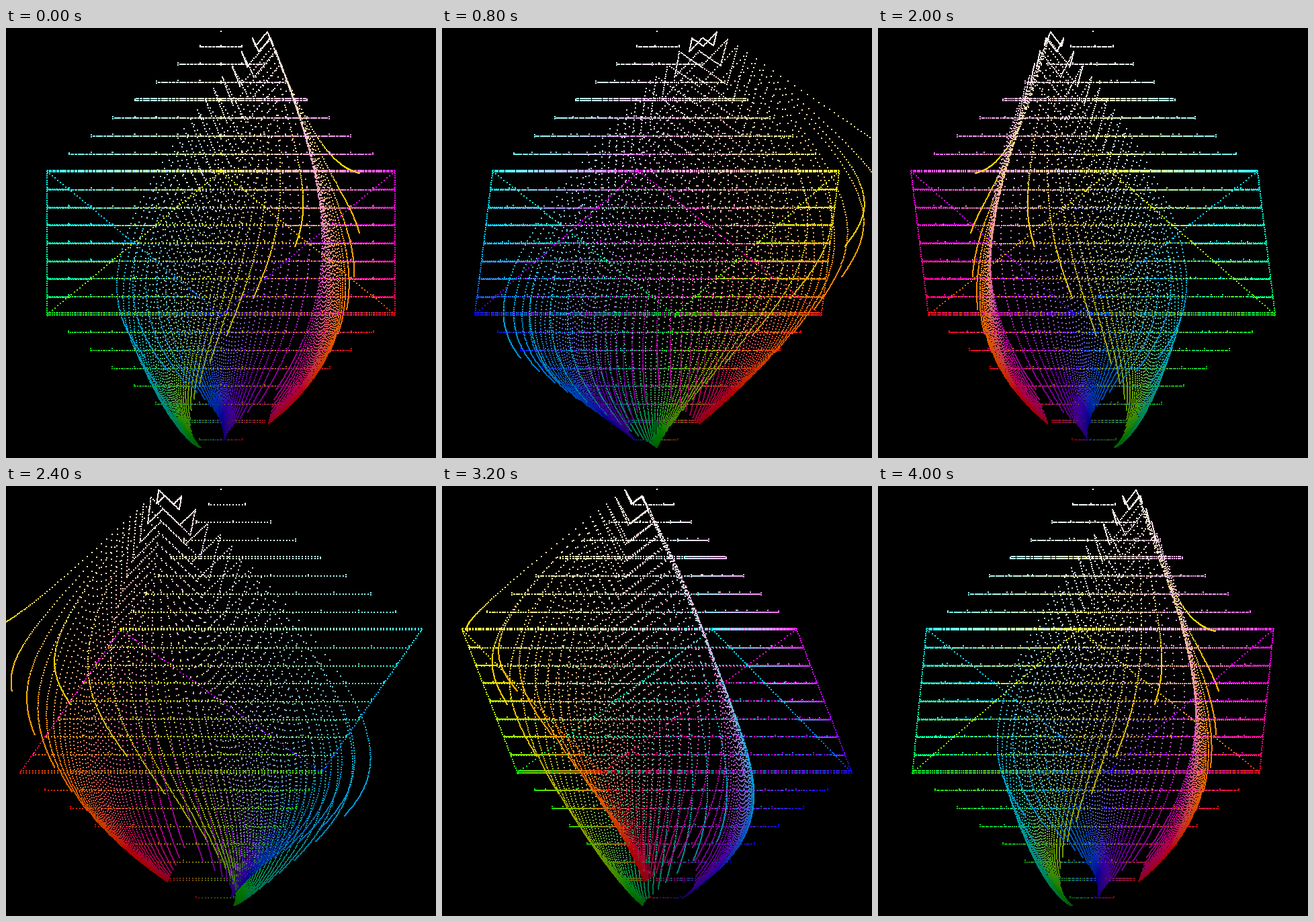
A matplotlib script for the animation above (4100 ms loop, 640 px wide and 640 px high).

```python
import itertools
import numpy as np
import matplotlib.pyplot as plt
from matplotlib.animation import FuncAnimation

SIZE = 640
FRAMES, INTERVAL = 41, 100
RADIUS = 299                 # distance of a pure primary from the grey axis
HEIGHT = SIZE / 3            # rise per unit of r + g + b
EDGE_STEPS = 64              # dots along a saturated cube edge
ROW_STEPS = 96               # lattice steps for the level rows
SLICE = ROW_STEPS // 8       # lattice steps between rows
HUES, LEVELS = 16, 100       # hue steps per side, density levels
AXES = np.radians([-30, 210, 90])

# Uneven turn: frame number -> degrees
TURN_AT = [0, 4, 13, 20, 24, 32, 40, 41]
TURN_DEG = [0, 30, 109, 175, 210, 284, 356, 360]


def hue_ring(n):
    """Zigzag through the six saturated corners, n steps per side."""
    corners = np.array([[1, 0, 0], [1, 1, 0], [0, 1, 0],
                        [0, 1, 1], [0, 0, 1], [1, 0, 1]], float)
    t = np.arange(n)[:, None] / n
    return np.vstack([a + (b - a) * t
                      for a, b in zip(corners, np.roll(corners, -1, axis=0))])


def cube_points():
    """Level rows of the RGB cube surface plus its saturated edges."""
    grid = np.indices((ROW_STEPS + 1,) * 3).reshape(3, -1).T
    total = grid.sum(axis=1)
    surface = (grid.min(axis=1) == 0) | (grid.max(axis=1) == ROW_STEPS)
    inside = (total > 0) & (total < 3 * ROW_STEPS)
    keep = surface & inside & (total % SLICE == 0)
    rows, level = grid[keep], total[keep] // SLICE
    # some rows have a second line just above, the rest only sparse dots
    twin = np.isin(level, [2, 8, 16, 20]) | (rows % SLICE == 0).all(axis=1)
    rgb = np.minimum(rows / ROW_STEPS, 255 / 256)
    raised = rgb[twin] + 2.6 / SIZE
    return np.vstack([raised, rgb, hue_ring(EDGE_STEPS)])


def lobe(x, mid, left, right):
    return np.exp(-0.5 * ((x - mid) / np.where(x < mid, left, right)) ** 2)


def spectrum_rgb(wl):
    """Linear sRGB of each wavelength, scaled so that flat light has Y = 1."""
    x = (1.056 * lobe(wl, 599.8, 37.9, 31.0) + 0.362 * lobe(wl, 442, 16, 26.7)
         - 0.065 * lobe(wl, 501.1, 20.4, 26.2))
    y = 0.821 * lobe(wl, 568.8, 46.9, 40.5) + 0.286 * lobe(wl, 530.9, 16.3, 31.1)
    z = 1.217 * lobe(wl, 437, 11.8, 36) + 0.681 * lobe(wl, 459, 26, 13.8)
    to_rgb = np.array([[3.2406, -1.5372, -0.4986],
                       [-0.9689, 1.8758, 0.0415],
                       [0.0557, -0.2040, 1.0570]])
    return (to_rgb @ np.array([x, y, z])).T / y.sum()


def shelf(wl, edge, soft):
    """Absorption of everything shorter than the edge."""
    return 1 / (1 + np.exp((wl - edge) / soft))


def dye_points():
    """Colours of white light through one or two dyes of rising density."""
    wl = np.arange(390, 731, 5.0)
    cyan = 7.5 * lobe(wl, 652, 62, 62) + 0.9 * shelf(wl, 450, 10)
    magenta = 6.9 * lobe(wl, 552, 54, 42) + 0.35 * shelf(wl, 478, 6)
    yellow = 5.6 * shelf(wl, 516.5, 6)
    density = hue_ring(HUES) @ np.array([cyan, magenta, yellow])
    level = np.arange(1, LEVELS + 1) / LEVELS
    passed = np.exp(-level[:, None, None] * density)
    return 0.99 * (passed @ spectrum_rgb(wl)).reshape(-1, 3)


def display(rgb):
    """Gamma-encode to 8 bit."""
    v = np.clip(rgb, 0, 1)
    v = np.where(v <= 0.0031308, 12.92 * v, 1.055 * v ** (1 / 2.4) - 0.055)
    return np.round(255 * v).astype(np.uint8)


points = np.vstack([cube_points(), dye_points()])
colors = display(points)
rows_y = np.round(SIZE - HEIGHT * points.sum(axis=1)).astype(int) - 1


def stamp(img, x, y, color):
    """Two-pixel square dots."""
    for dx, dy in itertools.product((0, 1), repeat=2):
        px, py = x + dx, y + dy
        ok = (px >= 0) & (px < SIZE) & (py >= 0) & (py < SIZE)
        img[py[ok], px[ok]] = color[ok]


def render(i):
    angle = np.radians(np.interp(i, TURN_AT, TURN_DEG))
    x = SIZE / 2 + RADIUS * (points @ np.cos(AXES + angle))
    img = np.zeros((SIZE, SIZE, 3), np.uint8)
    stamp(img, np.round(x).astype(int) - 1, rows_y, colors)
    img[4:6, 319:321] = 255
    return img


fig = plt.figure(figsize=(6.4, 6.4), dpi=100, facecolor="black")
ax = fig.add_axes([0, 0, 1, 1])
ax.axis("off")
picture = ax.imshow(render(0), interpolation="nearest", aspect="auto")


def update(i):
    picture.set_data(render(i))
    return [picture]


anim = FuncAnimation(fig, update, frames=FRAMES, interval=INTERVAL, repeat=True)
plt.show()
```
